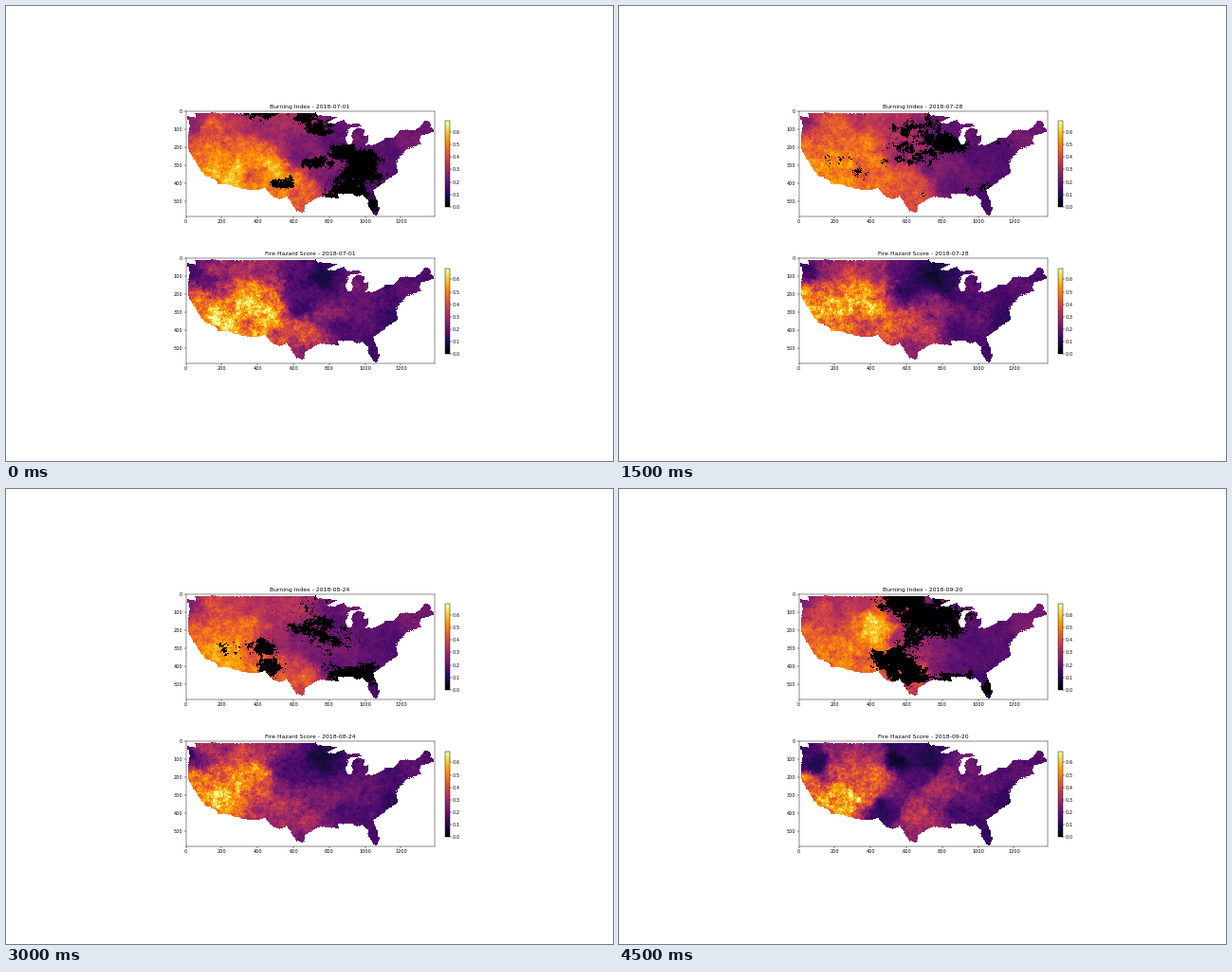
Animation of 640x480 px, one loop 5 s. Source, as a matplotlib script:

```python
import numpy as np
import matplotlib.pyplot as plt
from matplotlib.animation import FuncAnimation
from matplotlib.path import Path

COLS, ROWS, STEP = 1386, 585, 3
VMAX = 0.69
FRAMES, INTERVAL = 10, 500

# Outline of the land as longitude, latitude, clockwise from the north-west.
NORTH = [(-124.7, 48.4), (-122.6, 47.9), (-122.7, 49), (-95.1, 49), (-94.8, 49.3),
         (-94.6, 48.7), (-89.6, 48), (-92.1, 46.75), (-90.4, 46.6), (-88.1, 47.4),
         (-87.4, 46.5), (-85, 46.7), (-84, 46)]
LAKES = [(-86.7, 45.8), (-88, 44.6), (-87.1, 45.2), (-87.8, 43), (-87.5, 41.7),
         (-86.8, 41.75), (-86.2, 42.7), (-86.5, 43.7), (-86.2, 44.7), (-84.8, 45.7),
         (-83.4, 45.2), (-83.9, 43.7), (-82.8, 44), (-82.5, 42.6), (-83.4, 41.7),
         (-81.7, 41.5), (-78.9, 42.7), (-79, 43.3), (-76.4, 43.5), (-75, 45), (-71.5, 45)]
EAST = [(-70.3, 46), (-69.2, 47.4), (-68, 47.2), (-67.8, 45.7), (-67, 44.8), (-70, 43.8),
        (-70.8, 42.7), (-70.1, 41.7), (-73.6, 41), (-72, 41), (-74, 40.5), (-75.5, 38.5),
        (-76, 37.2), (-76.3, 39), (-75.6, 35.3), (-77.9, 33.9), (-81.4, 31), (-80, 27),
        (-80.4, 25.2)]
SOUTH = [(-81.1, 25.2), (-82.8, 27.8), (-82.7, 28.9), (-84, 30.1), (-85.2, 29.7),
         (-86.2, 30.4), (-89.5, 30.3), (-89.1, 29.1), (-93.8, 29.7), (-97.1, 27.8),
         (-97.3, 25.9), (-99.1, 26.4), (-101.4, 29.8), (-103.1, 29), (-104.6, 29.8),
         (-106.5, 31.75), (-108.2, 31.4), (-111, 31.3), (-114.8, 32.5)]
WEST = [(-117.1, 32.5), (-118.4, 33.8), (-120.6, 34.5), (-122.4, 37.4), (-124.3, 40.4),
        (-124.5, 42.8), (-124, 46.2)]

# Usual state of both maps: x, y in hundreds of cells, then the value.
INDEX = [(.4, .6, .25), (1.3, 1, .42), (3.3, .6, .34), (1, 2.4, .47), (3, 2, .46),
         (2.2, 3.4, .52), (3.8, 3.4, .44), (5.3, 1, .3), (5.5, 2.4, .27), (6.2, 4.3, .4),
         (7.3, 3, .23), (8.3, 1.5, .18), (8.2, 4, .19), (10.3, 2.2, .18),
         (12.8, 1.4, .22), (11.3, 3, .17), (10.5, 5, .14)]
HAZARD = [(.4, .8, .13), (1.8, .6, .3), (.6, 2.2, .5), (1.8, 1.6, .43), (2.1, 3.2, .65),
          (3, 2.3, .53), (3.6, 3.3, .47), (4.3, 1.8, .46), (4.2, .8, .3), (5.7, .7, .17),
          (5.7, 2.2, .18), (6.3, 4, .32), (6.4, 5, .26), (7.3, 1.1, .07), (7, 2, .14),
          (7.8, 3.2, .23), (8.7, 3.8, .15), (9.8, 1.7, .18), (10, 2.8, .19),
          (11.5, 2.2, .17), (11.5, 3.2, .11), (13, 1, .17), (10.4, 4.6, .13)]

X, Y = np.meshgrid(np.arange(0, COLS, STEP) / 100, np.arange(0, ROWS, STEP) / 100)


def noise(seed, power):
    """Smooth random field with unit spread; a higher power is softer."""
    rng = np.random.default_rng(seed)
    h, w = X.shape
    f = np.hypot(np.fft.fftfreq(h)[:, None], np.fft.rfftfreq(w)[None])
    spec = np.fft.rfft2(rng.standard_normal((h, w))) / (f + 0.01) ** power
    spec[0, 0] = 0
    out = np.fft.irfft2(spec, (h, w))
    return out / out.std()


def land_mask():
    ring = np.array(NORTH + LAKES + EAST + SOUTH + WEST)
    ring = np.column_stack([ring[:, 0] + 124.767, 49.4 - ring[:, 1]]) * 0.24
    px, py = X + 0.02 * noise(1, 1.2), Y + 0.02 * noise(2, 1.2)
    inside = Path(ring).contains_points(np.column_stack([px.ravel(), py.ravel()]))
    return inside.reshape(X.shape)


def bend(seed, dx, dy):
    return X + dx * noise(seed, 1.6), Y + dy * noise(seed + 1, 1.6)


def blend(base, extra, seed):
    """Weighted mix of points; the day's own points outweigh the usual ones."""
    bx, by = bend(seed, 0.13, 0.1)
    total = weight = 0
    for k, points in ((1, base), (4, extra)):
        for x, y, v in points:
            w = k / ((bx - x) ** 2 + 1.3 * (by - y) ** 2 + 0.12) ** 2
            total, weight = total + w * v, weight + w
    return total / weight


def wetness(spots, seed):
    """Positive inside flat ellipses (x, y, half width), negative outside."""
    bx, by = bend(seed, 0.18, 0.1)
    score = np.full(X.shape, -1.4)
    for x, y, r in spots:
        score = np.maximum(score, 1 - ((bx - x) / r) ** 2 - ((by - y) * 2 / r) ** 2)
    return score


keys = {}


def day(i, index, hazard, wet):
    keys[i] = (blend(INDEX, index, 100 + 10 * i), blend(HAZARD, hazard, 500 + 10 * i),
               wetness(wet, 300 + 10 * i))


day(0,
    index=[(4, .6, .3), (2.5, 3.4, .6), (4.6, 3, .53), (5.8, 4, .5), (6.2, 2.7, .21)],
    hazard=[(1.5, 1.3, .2), (3.7, 3, .6), (4.4, 2.8, .53), (6.3, 4, .42), (6.4, 2.8, .13)],
    wet=[(7.3, 1, .9), (4.4, -.25, 1.4), (6.6, .4, .7), (8.6, 2.2, .75), (9.9, 2.7, 1),
         (10, 3.6, 1.1), (9.3, 4.6, 1.2), (10.4, 5.3, .8), (7.2, 2.8, .75), (5.5, 3.9, .5)])
day(2,
    index=[(1.3, .9, .5), (4.2, 2, .52), (6, 4, .44)],
    hazard=[(.4, 2.1, .58), (2.4, 3.5, .29), (3.8, 2.5, .6), (3.7, 3.8, .2), (6.2, 3.8, .48)],
    wet=[(7.2, .6, 1.3), (8.4, 1.6, 1.1), (7, 2.6, .8), (2.2, 2.9, 1.05), (3.2, 3.4, .75),
         (3.6, .1, .6), (9.8, 4.3, 1.1)])
day(4,
    index=[(2.2, 1.2, .4), (1.4, 3.3, .57), (6.2, 3.9, .42)],
    hazard=[(2.1, 3.4, .68), (3.5, 3.2, .53), (6, 1.7, .04), (7.4, 2.6, .36),
            (6.2, 3.4, .36), (8.3, 1.5, .04)],
    wet=[(6.2, 1.8, 1.3), (8, 1.9, 1.4), (5.8, 1, .9), (5.4, 2.8, .85), (9.5, 2.2, 1),
         (7.2, 4.9, .6), (11, 1.8, .7)])
day(5,
    index=[(1.5, 1.2, .48), (5.5, .5, .36), (1.8, 3.3, .57), (6, 2.5, .22), (6.3, 5.2, .45)],
    hazard=[(1.2, .7, .45), (3.8, 1.1, .46), (5.3, .3, .34), (5.6, 1.5, .1), (2.5, 3.1, .54)],
    wet=[(6.7, 1.6, 1.05), (8.5, 2.7, 1.15), (9.4, 2.3, 1), (2.6, 3.1, .75), (4.7, 3, .8),
         (4.4, 3.8, .8), (12.7, 1.1, .75), (9.6, 4.5, 1)])
day(7,
    index=[(2.5, .6, .32), (2.1, 3.6, .54), (5, 1.5, .34), (8.5, 2.7, .23)],
    hazard=[(1.5, .5, .19), (4, 3.8, .12), (3.3, 3.2, .4), (6, 2.6, .29), (8, 1.4, .08),
            (8.7, 2.8, .23)],
    wet=[(7.6, .6, 1), (7, 2.2, 1.1), (8, 1.6, 1), (4.2, 3, 1.05), (5, 4.1, 1.1),
         (8.3, 4.3, 1.5), (10.4, 4.2, 1.2), (10.5, 5.3, .8)])
day(8,
    index=[(1, .7, .25), (2.2, 3.3, .57), (4, 1.6, .46), (7.2, 2.3, .2), (9, 2.2, .13)],
    hazard=[(1.5, .9, .14), (4.5, 1, .42), (3.2, 2.9, .57), (6, 1.3, .12), (6, 3.5, .15),
            (11.6, 2.8, .07)],
    wet=[(.3, .4, .55), (.3, .9, .55), (7.5, 4.1, 1.1), (6.3, 4.6, 1), (10.6, 3.3, 1.3),
         (12, 2, 1.1), (13, 1, .75), (9.4, 4, .9)])
day(9,
    index=[(2, .9, .34), (4.2, 1.9, .58), (6.5, 3.1, .28), (9.5, 2.2, .16)],
    hazard=[(1, 1.4, .09), (3.3, 2.1, .39), (2.7, 3.1, .6), (4.4, 3.8, .1), (5.4, 1, .05),
            (7.8, 2.5, .33)],
    wet=[(5.5, .4, 1.6), (7.4, 1.3, 2), (5.2, 3.6, 1.3), (6, 2.6, .9), (6, 4.4, 1.1),
         (8.5, 4.8, 1), (10.5, 5.2, 1)])

LAND = land_mask()
TERRAIN = noise(7, 1.2)


def fields(i):
    """Both maps for one step; days without own points lie between neighbours."""
    pair = [keys[i]] if i in keys else [keys[i - 1], keys[i + 1]]
    index, hazard, wet = (sum(part) / len(pair) for part in zip(*pair))
    grain = 0.6 * TERRAIN + 0.6 * noise(20 + i, 1.3)
    index = index * (1 + 0.09 * grain)
    index[wet + 0.36 * noise(40 + i, 1.3) > 0] = 0
    hazard = hazard * (1 + 0.15 * grain)
    return [np.where(LAND, np.clip(m, 0, VMAX), np.nan) for m in (index, hazard)]


maps = [fields(i) for i in range(FRAMES)]

# Chart furniture at a fixed fraction of the usual matplotlib sizes.
K = 0.365
plt.rcParams["font.family"] = "DejaVu Sans"
fig = plt.figure(figsize=(6.4, 4.8), dpi=100, facecolor="white")


def panel(left, top, width, height):
    return fig.add_axes([left / 640, 1 - (top + height) / 480, width / 640, height / 480])


def style(ax):
    ax.tick_params(labelsize=10 * K, length=3.5 * K, width=0.9 * K, pad=3.5 * K)
    for spine in ax.spines.values():
        spine.set_linewidth(0.9 * K)


images, titles = [], []
for top in (111, 266.3):
    ax = panel(189.5, top, 262, 110.6)
    im = ax.imshow(maps[0][0], cmap="inferno", vmin=0, vmax=VMAX, aspect="auto",
                   interpolation="nearest", extent=(-0.5, COLS - 0.5, ROWS - 0.5, -0.5))
    ax.set_xticks(range(0, 1201, 200))
    ax.set_yticks(range(0, 501, 100))
    style(ax)
    titles.append(ax.set_title("", fontsize=12 * K, pad=6 * K))
    cax = panel(463, top + 10.4, 4.5, 90.4)
    bar = fig.colorbar(im, cax=cax, ticks=np.arange(7) / 10)
    bar.outline.set_linewidth(0.9 * K)
    style(cax)
    images.append(im)


def draw(i):
    date = np.datetime64("2018-07-01") + 9 * i
    names = ("Burning Index", "Fire Hazard Score")
    for im, title, name, data in zip(images, titles, names, maps[i]):
        im.set_data(data)
        title.set_text(f"{name} - {date}")
    return images + titles


anim = FuncAnimation(fig, draw, frames=FRAMES, interval=INTERVAL, repeat=True,
                     repeat_delay=0, blit=False)
plt.show()
```
